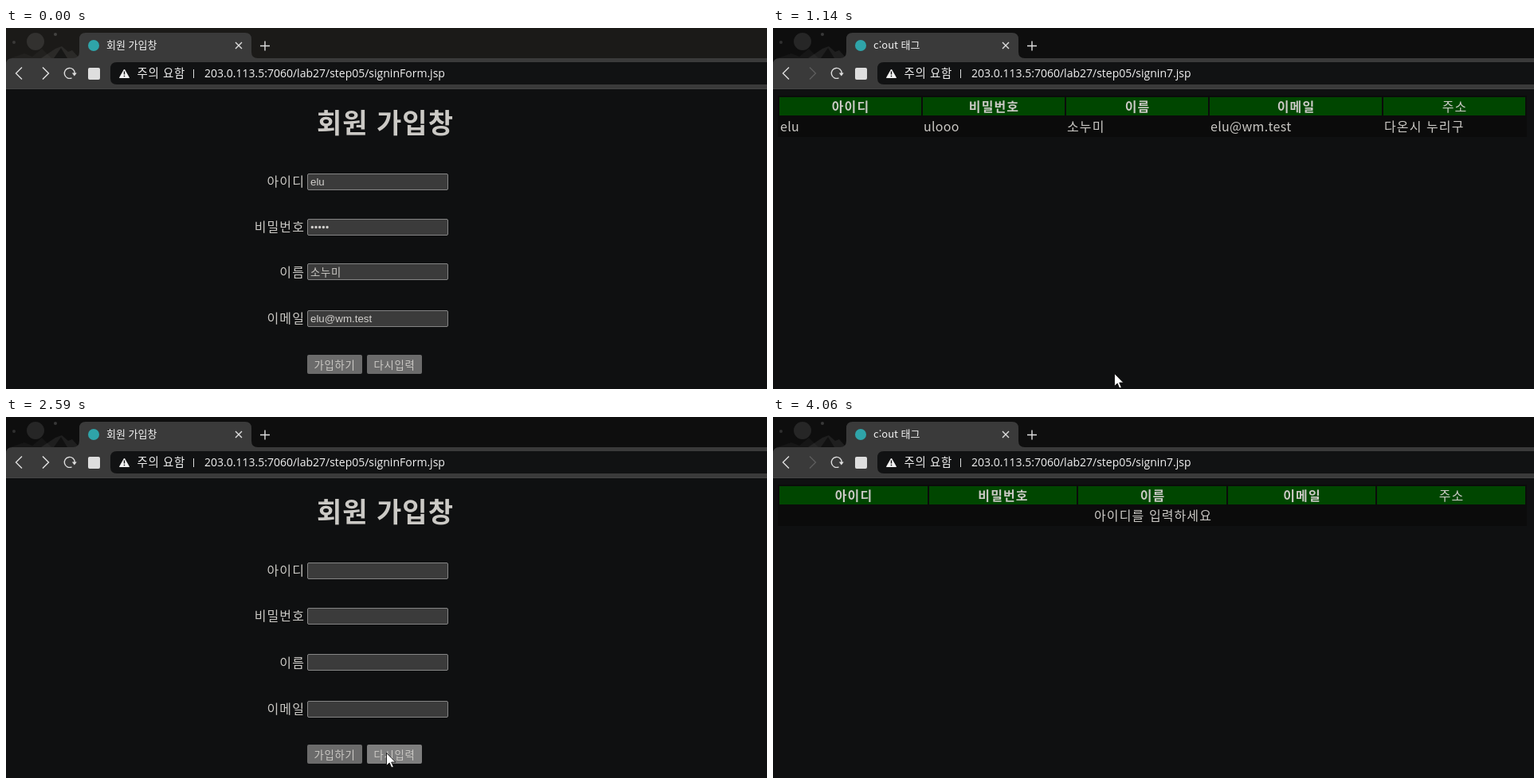
These frames come from a looping animation (955 px wide and 454 px high, 4.13 s). An HTML page:

```html
<!DOCTYPE html>
<html lang="ko">
<head>
<meta charset="utf-8">
<title>회원 가입창</title>
<style>
html, body { margin: 0; width: 100%; height: 100%; overflow: hidden; background: #0f1011; }
svg { display: block; width: 955px; height: 454px; }
text { font: 16px "Noto Sans CJK KR", "Noto Sans CJK", "Noto Sans", sans-serif; fill: #cbc9c5; white-space: pre; }

/* text styles */
.ko { letter-spacing: 1.1px; }
.latin { letter-spacing: .3px; }
.title { font-size: 34px; font-weight: 700; letter-spacing: 1px; }
.label { letter-spacing: 1.1px; text-anchor: end; }
.value { font: 13.333px "Liberation Sans", Arial, sans-serif; fill: #d2d0cd; }
.small { font-size: 13.333px; letter-spacing: .75px; }
.tab { font-size: 13px; fill: #f2f2f2; }
.warn { font-size: 14.5px; letter-spacing: .6px; fill: #eee; }
.url { font: 14px "Open Sans", "Noto Sans", sans-serif; fill: #f2f2f2; }
.head text { font-weight: 700; letter-spacing: 1.1px; text-anchor: middle; }
.head .light { font-weight: 500; }
.head rect { fill: #004600; }

/* shapes */
.field { fill: #3b3b3b; stroke: #858585; }
.button { fill: #6b6b6b; }
.line { fill: none; stroke: #dedede; stroke-width: 1.4; }

/* timeline */
.form, .filled, .result, .empty, .busy, .idle, .dot, .dots, .back, .rows, .actions, .strip, .join, .reset, .cursor {
  animation: 4.13s step-end infinite;
}
.form { animation-name: form; }
.filled { animation-name: filled; }
.result { animation-name: result; }
.empty { animation-name: empty; }
.busy { animation-name: busy; }
.idle { animation-name: idle; }
.icon { animation: 4.13s step-end infinite icon; }
.dot { animation-name: dot; }
.dots { animation-name: dots; }
.back { animation-name: back; }
.rows { animation-name: rows; }
.actions { animation-name: actions; }
.strip { animation-name: strip; }
.join { animation-name: join; }
.reset { animation-name: reset; }
.cursor { animation-name: cursor; }

@keyframes form { 0%, 49.394% { opacity: 1 } 27.602%, 77.481%, 100% { opacity: 0 } }
@keyframes filled { 0%, 49.394% { opacity: 1 } 27.602%, 62.711%, 100% { opacity: 0 } }
@keyframes result { 0%, 49.394%, 100% { opacity: 0 } 27.602% { opacity: 1 } }
@keyframes empty { 0% { opacity: 0 } 77.481%, 100% { opacity: 1 } }
@keyframes busy { 0%, 27.602%, 49.394%, 77.481%, 100% { opacity: 0 } 24.213%, 47.699%, 72.639% { opacity: 1 } }
@keyframes idle { 0%, 27.602%, 49.394%, 77.481%, 100% { opacity: 1 } 24.213%, 47.699%, 72.639% { opacity: 0 } }
@keyframes icon { 0%, 27.602%, 49.394%, 77.481%, 100% { opacity: 1 } 24.213%, 47.699%, 75.786% { opacity: 0 } }
@keyframes dot { 0%, 25.907%, 49.394%, 77.481%, 100% { opacity: 0 } 24.213%, 47.699%, 75.786% { opacity: 1 } }
@keyframes dots { 0%, 27.602%, 100% { opacity: 0 } 25.907% { opacity: 1 } }
@keyframes back { 0%, 59.564%, 100% { opacity: 0 } 46.004% { opacity: 1 } }
@keyframes rows { 0% { transform: none } 62.711%, 100% { transform: translateY(2px) } }
@keyframes actions { 0% { transform: none } 62.711%, 100% { transform: translateY(1px) } }
@keyframes strip { 0% { fill: #1b1a18 } 21.065%, 100% { fill: #0e0e0e } }
@keyframes join { 0%, 27.602%, 77.481%, 100% { fill: #6b6b6b } 11.38%, 67.795% { fill: #7e7e7e } }
@keyframes reset { 0%, 66.1%, 100% { fill: #6b6b6b } 61.259% { fill: #7e7e7e } }
@keyframes cursor {
  0% { transform: translate(440px, 470px) }
  7.99% { transform: translate(438px, 447px) }
  9.685% { transform: translate(434px, 440px) }
  11.38% { transform: translate(430px, 435px) }
  13.075% { transform: translate(428px, 434px) }
  34.14% { transform: translate(392px, 382px) }
  35.835% { transform: translate(250px, 225px) }
  37.53% { transform: translate(95px, 88px) }
  39.225% { transform: translate(14px, 30px) }
  40.92% { transform: translate(12px, 50px) }
  42.615% { transform: translate(15px, 56px) }
  46.004% { transform: translate(18px, 59px) }
  49.394% { transform: translate(21px, 62px) }
  59.564% { transform: translate(210px, 205px) }
  61.259% { transform: translate(468px, 416px) }
  62.711% { transform: translate(477px, 422px) }
  64.406% { transform: translate(470px, 424px) }
  66.1% { transform: translate(450px, 425px) }
  67.795% { transform: translate(430px, 426px) }
  69.49% { transform: translate(421px, 426px) }
  95.157% { transform: translate(456px, 436px) }
  96.852% { transform: translate(524px, 446px) }
  98.305%, 100% { transform: translate(540px, 470px) }
}
</style>
</head>
<body>
<svg viewBox="0 0 955 454">
  <rect width="955" height="454" fill="#0f1011"/>

  <!-- tab strip -->
  <rect class="strip" width="955" height="48" fill="#1b1a18"/>
  <g fill="#fff">
    <circle cx="37" cy="17" r="11" opacity=".1"/>
    <circle cx="10" cy="18" r="2" opacity=".14"/>
    <circle cx="62" cy="8" r="2" opacity=".18"/>
    <path d="M6 38l17-6 10 4 12-10 12 12z" opacity=".03"/>
    <path d="M44 38l18-12 8-3 8 7 5-2 9 10z" opacity=".07"/>
  </g>
  <path d="M60 38l9-13 8 13z" opacity=".45"/>
  <path d="M0 76V46q0-8 8-8H84q8 0 8-8V14q0-8 8-8H300q8 0 8 8V30q0 8 8 8H955V76z" fill="#3a3a3a"/>
  <path d="M0 76.5H955" stroke="#444"/>
  <path class="line" d="M288 18l8 8m0-8l-8 8M319 22.500h12m-6-6v12" stroke-width="1.600"/>
  <circle class="icon" cx="110" cy="22" r="7" fill="#2fa4a9"/>
  <circle class="dot" cx="105" cy="22" r="1.600" fill="#aaa"/>
  <g class="dots" fill="#aaa"><circle cx="105" cy="22" r="3"/><circle cx="114" cy="22" r="1.300"/></g>

  <!-- toolbar -->
  <rect class="back" x="6" y="45" width="24" height="24" rx="4" fill="#686868"/>
  <path class="line" d="M20 49.500l-7.500 7.500 7.500 7.500"/>
  <path class="line" d="M46 49.500l7.500 7.500-7.500 7.500" style="stroke:#5d5d5d"/>
  <g class="idle">
    <path class="line" d="M82.500 62.800A6.500 6.500 0 1 1 86.300 57"/>
    <path d="M82.800 56.500h6l-3 4z" fill="#dedede"/>
  </g>
  <path class="line busy" d="M75 52l10 10m0-10l-10 10"/>
  <rect x="103" y="50" width="15" height="15" rx="2" fill="#dedede"/>
  <path d="M955 43H139q-8 0-8 8V63q0 8 8 8H955z" fill="#111213"/>
  <path d="M148.500 52l6 10.500h-12z" fill="#f2f2f2" stroke="#f2f2f2" stroke-linejoin="round"/>
  <path d="M148.500 54.500v4m0 1.300v1.500" stroke="#111213" stroke-width="1.400"/>
  <text class="warn" x="164.500" y="62">주의 요함</text>
  <path d="M235.500 52v11" stroke="#ddd"/>

  <!-- sign-up form -->
  <g class="form">
    <text class="tab" x="126" y="26">회원 가입창</text>
    <text class="url" x="249" y="62">203.0.113.5:7060/lab27/step05/signinForm.jsp</text>
    <path class="line" d="M46 49.500l7.500 7.500-7.500 7.500"/>
    <text class="title" x="390" y="132">회원 가입창</text>
    <text class="label" x="375" y="199">아이디</text>
    <rect class="field" x="378.500" y="183.500" width="176" height="20" rx="1.500"/>
    <text class="label" x="375" y="256">비밀번호</text>
    <rect class="field" x="378.500" y="240.500" width="176" height="20" rx="1.500"/>
    <g class="rows">
      <text class="label" x="375" y="312.500">이름</text>
      <rect class="field" x="378.500" y="296.500" width="176" height="20" rx="1.500"/>
      <text class="label" x="375" y="371">이메일</text>
      <rect class="field" x="378.500" y="355.500" width="176" height="20" rx="1.500"/>
    </g>
    <g class="actions">
      <rect class="button join" x="378" y="411" width="69" height="24" rx="2"/>
      <text class="small" x="386.500" y="428.500">가입하기</text>
      <rect class="button reset" x="453" y="411" width="69" height="24" rx="2"/>
      <text class="small" x="461.500" y="428.500">다시입력</text>
    </g>
  </g>
  <g class="filled">
    <text class="value" x="382" y="198">elu</text>
    <path d="M384.300 250.500h20" stroke="#d2d0cd" stroke-width="3.400" stroke-linecap="round" stroke-dasharray="0 4.700"/>
    <text class="small" x="382" y="312">소누미</text>
    <text class="value" x="382" y="370">elu@wm.test</text>
  </g>

  <!-- result with data -->
  <g class="result" opacity="0">
    <text class="tab" x="126" y="26">c:out 태그</text>
    <text class="url" x="249" y="62">203.0.113.5:7060/lab27/step05/signin7.jsp</text>
    <rect x="6" y="85" width="940" height="52" fill="#0b0b0b"/>
    <g class="head">
      <rect x="8" y="87" width="178" height="23"/>
      <rect x="188" y="87" width="178" height="23"/>
      <rect x="368" y="87" width="178" height="23"/>
      <rect x="548" y="87" width="216" height="23"/>
      <rect x="766" y="87" width="178" height="23"/>
      <text x="97.500" y="105">아이디</text>
      <text x="277.500" y="105">비밀번호</text>
      <text x="457.500" y="105">이름</text>
      <text x="656.500" y="105">이메일</text>
      <text class="light" x="855.500" y="105">주소</text>
    </g>
    <text class="latin" x="9" y="130">elu</text>
    <text class="latin" x="189" y="130">ulooo</text>
    <text class="ko" x="369" y="130">소누미</text>
    <text class="latin" x="549" y="130">elu@wm.test</text>
    <text class="ko" x="767" y="130">다온시 누리구</text>
  </g>

  <!-- result without id -->
  <g class="empty" opacity="0">
    <text class="tab" x="126" y="26">c:out 태그</text>
    <text class="url" x="249" y="62">203.0.113.5:7060/lab27/step05/signin7.jsp</text>
    <rect x="6" y="85" width="940" height="52" fill="#0b0b0b"/>
    <g class="head">
      <rect x="8" y="87" width="186" height="23"/>
      <rect x="196" y="87" width="185" height="23"/>
      <rect x="383" y="87" width="186" height="23"/>
      <rect x="571" y="87" width="185" height="23"/>
      <rect x="758" y="87" width="186" height="23"/>
      <text x="101.500" y="105">아이디</text>
      <text x="289" y="105">비밀번호</text>
      <text x="476.500" y="105">이름</text>
      <text x="664" y="105">이메일</text>
      <text class="light" x="851.500" y="105">주소</text>
    </g>
    <text class="ko" x="477" y="130" text-anchor="middle">아이디를 입력하세요</text>
  </g>

  <path class="cursor" d="M.5.5V16.500l3.700-3.500 2.600 6 2.500-1.100-2.600-5.800h5.100z" fill="#fff" stroke="#111" stroke-width=".9"/>
</svg>
</body>
</html>
```
